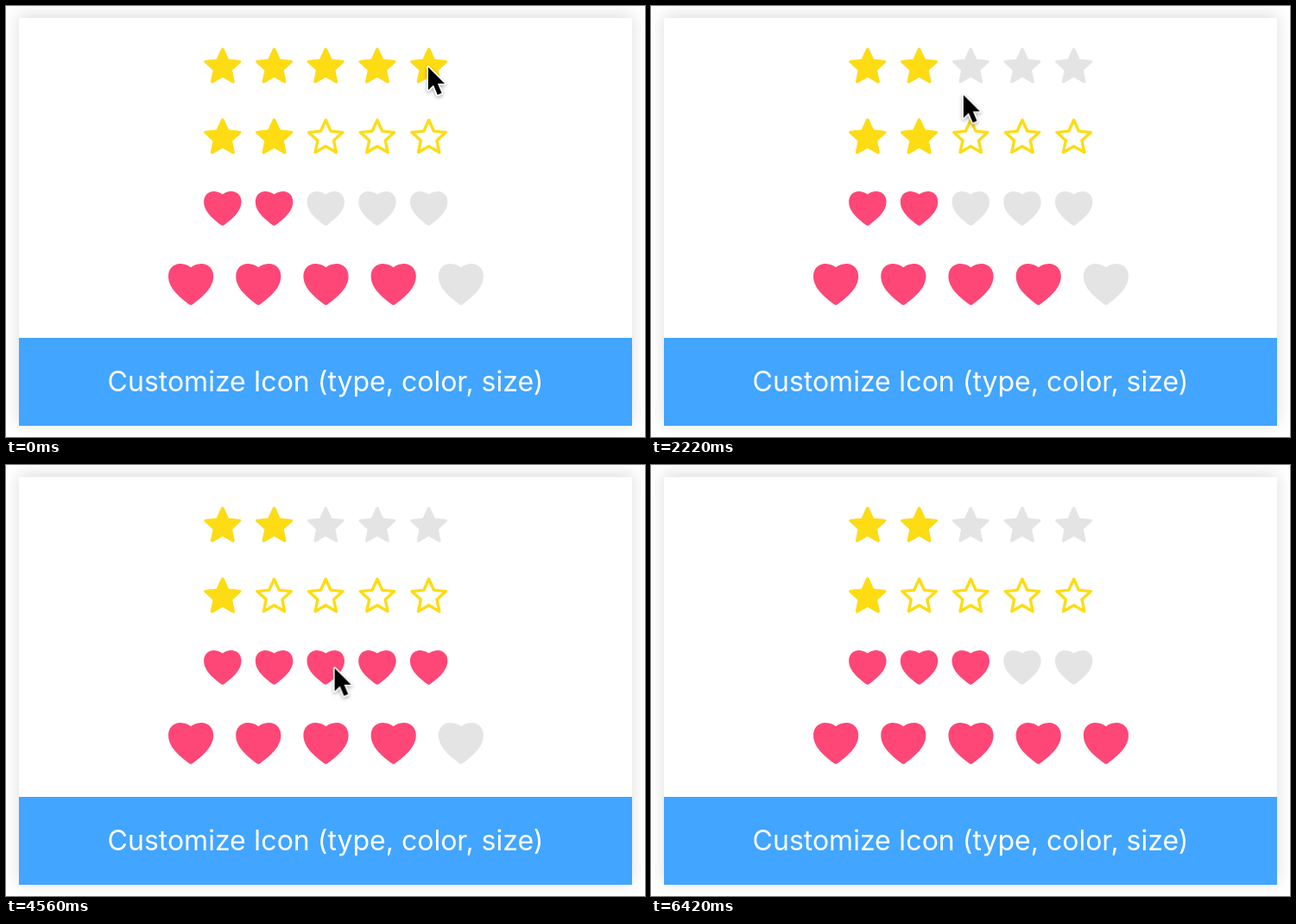
These frames come from a looping animation (740 by 500 pixels, 6.78 s). An HTML page:

```html
<!DOCTYPE html>
<html lang="en">
<head>
<meta charset="utf-8">
<title>Rating icons</title>
<style>
  html, body { margin: 0; width: 100%; height: 100%; overflow: hidden; background: #fff; }
  .stage { position: relative; width: 740px; height: 500px; overflow: hidden; }
  .card {
    position: absolute; left: 15px; top: 14px; width: 710px; height: 473px;
    background: #fff; box-shadow: 0 -3px 18px rgba(0, 0, 0, .14);
  }
  .caption {
    position: absolute; left: 0; right: 0; bottom: 0; height: 102px;
    background: #42a5ff; color: #fff;
    font: 400 32px/102px Inter, "Noto Sans", sans-serif;
    text-align: center; white-space: nowrap;
  }
  .row { position: absolute; height: 60px; width: calc(5 * var(--pitch)); left: calc(370px - 2.5 * var(--pitch)); }
  .row svg { position: absolute; left: 0; top: 0; width: 100%; height: 60px; overflow: hidden; }
  .row .on {
    width: calc(var(--n) * var(--pitch));
    animation: var(--rate) 6780ms step-end infinite;
  }
  .gray { fill: #e5e4e5; stroke: #e5e4e5; }
  .yellow { fill: #fddc14; stroke: #fddc14; }
  .pink { fill: #ff4777; stroke: #ff4777; }
  .outline { fill: #fff; stroke: #fddc14; }

  @keyframes rate1 { 0% { --n: 5 } 19.47% { --n: 1 } 28.32% { --n: 2 } }
  @keyframes rate2 { 0% { --n: 2 } 38.05% { --n: 4 } 44.25% { --n: 1 } }
  @keyframes rate3 { 0% { --n: 2 } 57.52% { --n: 5 } 69.91% { --n: 3 } }
  @keyframes rate4 { 0% { --n: 4 } 83.19% { --n: 5 } }

  .cursor {
    position: absolute; left: 0; top: 0; width: 40px; height: 50px; overflow: visible;
    filter: drop-shadow(0 2px 2px rgba(0, 0, 0, .3));
    animation: point 6780ms ease-in-out infinite;
  }
  @keyframes point {
    0%, 3% { transform: translate(489px, 71px) }
    9.73%  { transform: translate(499px, 60px) }
    18.6%  { transform: translate(257px, 68px) }
    22.12% { transform: translate(263px, 66px) }
    27.4%, 29.2% { transform: translate(314px, 70px) }
    37.2%, 38.6% { transform: translate(432px, 152px) }
    42.48% { transform: translate(269px, 147px) }
    44%, 46% { transform: translate(257px, 152px) }
    56.6%, 58.41% { transform: translate(497px, 232px) }
    69%, 71% { transform: translate(374px, 236px) }
    76.99% { transform: translate(380px, 322px) }
    82.3%, 85% { transform: translate(528px, 324px) }
    94%, 100% { transform: translate(560px, 520px) }
  }
</style>
</head>
<body>
<div class="stage">
  <div class="card"><div class="caption">Customize Icon (type, color, size)</div></div>

  <svg width="0" height="0" style="position:absolute">
    <defs>
      <path id="star" stroke-width="3.4" stroke-linejoin="round"/>
      <path id="heart" stroke="none" d="M0-16.5C-4-19.5-8-20-11-20C-17.5-19.5-21.7-14.5-21.7-8
        C-21.7 5-8 14-1.5 19.3Q0 20.2 1.5 19.3C8 14 21.7 5 21.7-8C21.7-14.5 17.5-19.5 11-20C8-20 4-19.5 0-16.5Z"/>
    </defs>
  </svg>

  <div id="rows"></div>

  <svg class="cursor">
    <path d="M0 0V26.5L6 20.7L10.8 32L15.6 30L10.9 19H19Z"
      stroke="#fff" stroke-width="3.2" stroke-linejoin="round" paint-order="stroke"/>
  </svg>
</div>

<script>
  const rows = [
    { icon: 'star', y: 70.6, off: 'gray', on: 'yellow' },
    { icon: 'star', y: 153.2, off: 'outline', on: 'yellow' },
    { icon: 'heart', y: 235, off: 'gray', on: 'pink' },
    { icon: 'heart', y: 323, off: 'gray', on: 'pink', pitch: 78.2, scale: 1.2 }
  ];

  const starPath = (outer, inner) => 'M' + Array.from({ length: 10 }, (_, i) => {
    const r = i % 2 ? inner : outer, a = i * Math.PI / 5;
    return `${(r * Math.sin(a)).toFixed(2)} ${(-r * Math.cos(a)).toFixed(2)}`;
  }).join('L') + 'Z';

  const icons = (id, pitch, scale) => Array.from({ length: 5 }, (_, i) =>
    `<use href="#${id}" transform="translate(${pitch * (i + .5)} 30) scale(${scale})"/>`).join('');

  document.getElementById('star').setAttribute('d', starPath(20.7, 9.8));
  document.getElementById('rows').innerHTML = rows.map((row, i) => {
    const { icon, y, off, on, pitch = 59.7, scale = 1 } = row;
    const set = icons(icon, pitch, scale);
    return `<div class="row" style="top:${y - 30}px;--pitch:${pitch}px;--rate:rate${i + 1}">
      <svg class="${off}">${set}</svg><svg class="on ${on}">${set}</svg></div>`;
  }).join('');
</script>
</body>
</html>
```
